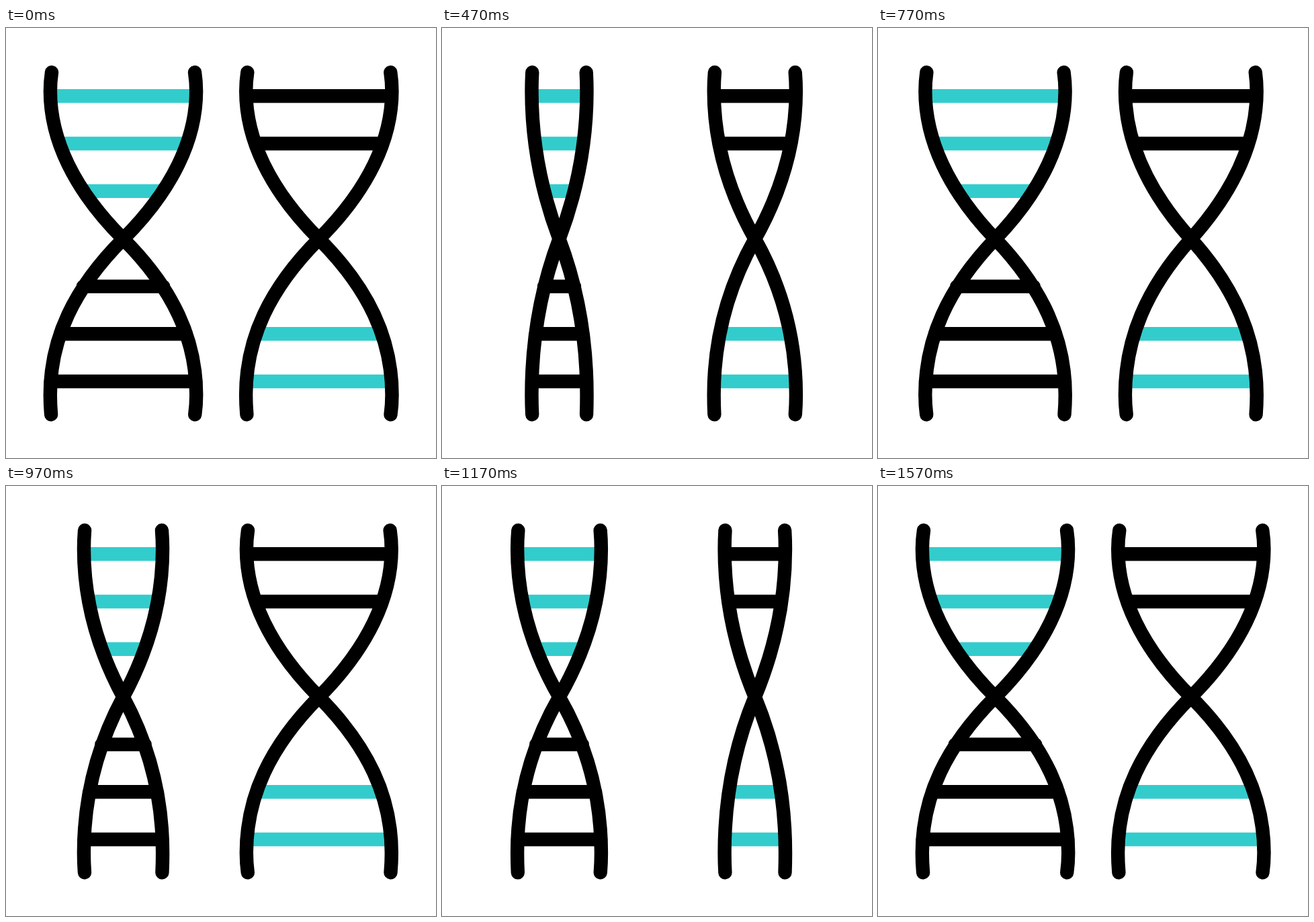
An HTML page for the animation above (1.67 s loop, 640 by 640 pixels).

```html
<!DOCTYPE html>
<html lang="en">
<head>
<meta charset="utf-8">
<title>Twisting helices</title>
<style>
  html, body { margin: 0; width: 100%; height: 100%; overflow: hidden; background: #fff; }
  svg { display: block; width: 100vw; height: 100vh; }
  path { fill: none; stroke: #000; stroke-width: 20.4; stroke-linecap: round; stroke-linejoin: round; }
  .teal { stroke: #33cccc; stroke-linecap: butt; }
</style>
</head>
<body>
<svg id="stage" viewBox="0 0 640 640"></svg>
<script>
const LOOP = 1670, TURN = 20, MID = 314, EASE = 0.53;
const stage = document.getElementById('stage');

// Rungs: [y, half width at rest]
const rungs = {
  r1: [101.3, 108.3], r2: [172, 94.2], r3: [242.8, 59.7],
  r5: [384.6, 59.7], r6: [455.3, 93.8], r7: [526, 108.2]
};
const { r1, r2, r3, r5, r6, r7 } = rungs;

// start: first frame of the turn; back: width when seen from behind
const helices = [
  { x: 174.5, start: 2, back: -0.965, teal: [r1, r2, r3], black: [r5, r6, r7] },
  { x: 465.8, start: 7, back: -1.02, teal: [r6, r7], black: [r1, r2] }
];

function addPath(cls) {
  const p = document.createElementNS('http://www.w3.org/2000/svg', 'path');
  if (cls) p.setAttribute('class', cls);
  return stage.appendChild(p);
}
for (const h of helices) {
  h.tealPath = addPath('teal');
  h.blackPath = addPath();
}

// Symmetric cubic-bezier(EASE, 0, 1 - EASE, 1)
function ease(u) {
  if (u <= 0) return 0;
  if (u >= 1) return 1;
  let lo = 0, hi = 1;
  for (let i = 0; i < 30; i++) {
    const t = (lo + hi) / 2, q = 1 - t;
    const x = 3 * q * q * t * EASE + 3 * q * t * t * (1 - EASE) + t * t * t;
    if (x < u) lo = t; else hi = t;
  }
  return lo * lo * (3 - 2 * lo);
}

function widthAt(h, frame) {
  const n = frame - h.start;
  return n < TURN
    ? 1 + (h.back - 1) * ease(n / TURN)
    : h.back + (1 - h.back) * ease(n / TURN - 1);
}

// One strand from top to bottom; side is -1 when it begins on the left
function strand(cx, s, side) {
  const at = (half, dy) => (cx + side * s * half).toFixed(2) + ' ' + (MID + dy).toFixed(2) + ' ';
  const foot = side > 0 ? -107.4 : -106.7;
  return 'M' + at(106.5, -248) +
    'Q' + at(108.6, -234) + at(108.6, -220) +
    'C' + at(108.6, -149) + at(74, -74) + at(0, 0) +
    'C' + at(-74, 74) + at(-108.7, 149) + at(-108.7, 232) +
    'Q' + at(-108.7, 247) + at(foot, 261.3);
}

const bars = (cx, s, list) => list.map(([y, half]) => {
  const w = Math.abs(half * s);
  return `M${(cx - w).toFixed(2)} ${y}H${(cx + w).toFixed(2)}`;
}).join('');

function draw(ms) {
  // 30 frames per second, each shown on a 10 ms grid
  const frame = Math.floor((3 * Math.floor(ms / 10) + 1) / 10);
  for (const h of helices) {
    const s = widthAt(h, frame);
    h.tealPath.setAttribute('d', bars(h.x, s, h.teal));
    h.blackPath.setAttribute('d',
      strand(h.x, s, -1) + strand(h.x, s, 1) + bars(h.x, s, h.black));
  }
}

let begin = null;
function tick(now) {
  if (begin === null) begin = now;
  draw(Math.max(0, now - begin) % LOOP);
  requestAnimationFrame(tick);
}
draw(0);
requestAnimationFrame(tick);
</script>
</body>
</html>
```
